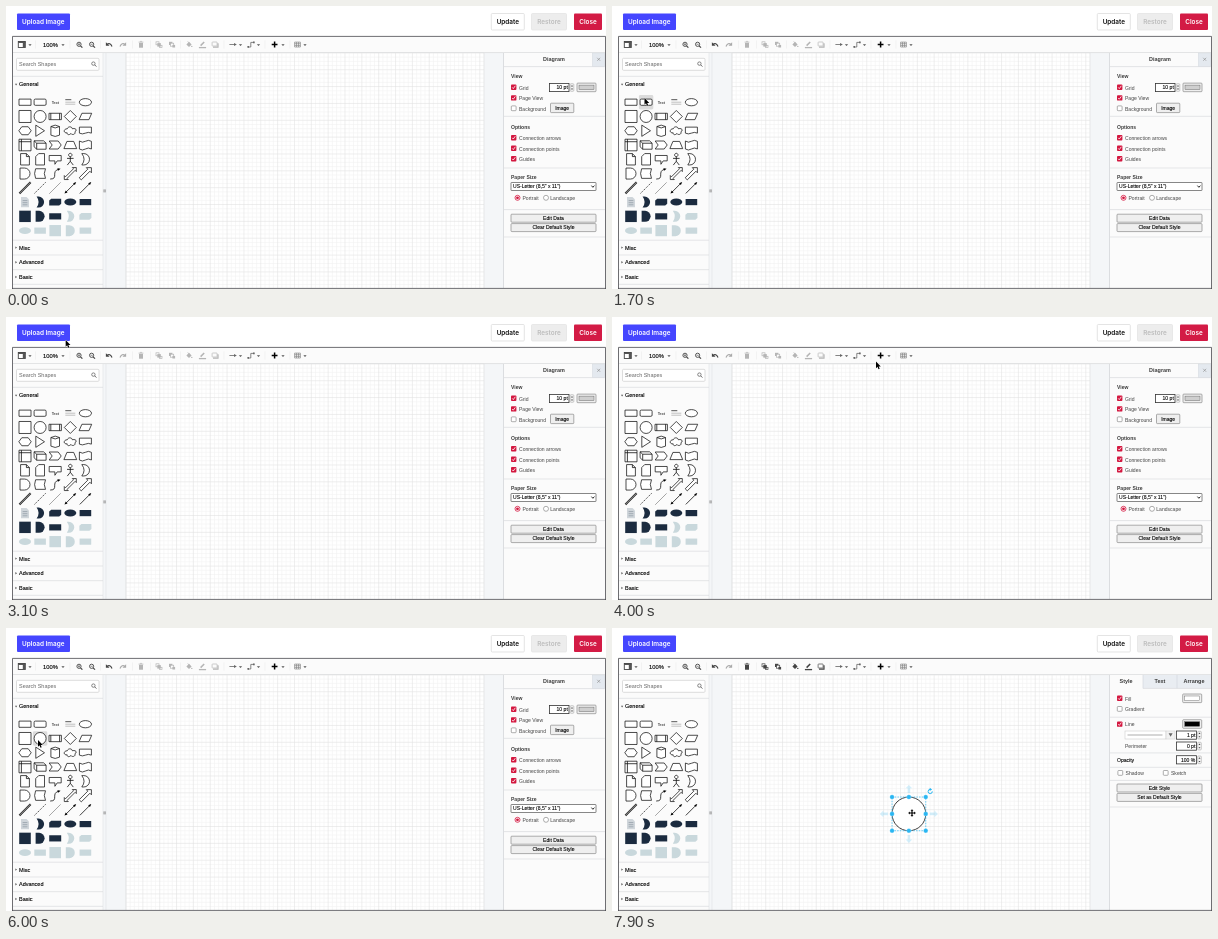
An HTML page that plays this animation: 600 by 283 pixels, repeating every 8 s.

```html
<!DOCTYPE html>
<html lang="en">
<head>
<meta charset="utf-8">
<title>Diagram editor</title>
<style>
html, body { margin: 0; width: 100%; height: 100%; overflow: hidden; background: #fff; }
svg { display: block; width: 600px; height: 283px; }
text { font: 5.05px "Liberation Sans", Arial, sans-serif; fill: #444; white-space: pre; }
.b { font-weight: 700; fill: #3c3c3c; }
.h { font-size: 5.5px; fill: #000; stroke: #000; stroke-width: .12; }
.t { font-size: 5.45px; font-weight: 700; fill: #3c3c3c; }
.k { fill: #000; stroke: #000; stroke-width: .1; }
.btn { font: 600 6.4px Inter, "Liberation Sans", sans-serif; }
.m { text-anchor: middle; }
.e { text-anchor: end; }
</style>
</head>
<body>
<svg id="stage" viewBox="0 0 600 283" xmlns="http://www.w3.org/2000/svg"></svg>
<script>
const LOOP = 8000, STEP = 100, PRESS = 6700, DRAG = 6900, DROP = 7300;
const UNIT = 4.2118, PAGE = { x: 120, y: 46.9, w: 358 };
const BLUE = '#29b6f2', DARK = '#1b2b3f', PALE = '#c9d8dc', RED = '#d3173f', LINE = '#dadcde';

const rect = (x, y, w, h, fill, stroke = 'none', r = 0, sw = .7) =>
  `<rect x="${x}" y="${y}" width="${w}" height="${h}" rx="${r}" fill="${fill}" stroke="${stroke}" stroke-width="${sw}"/>`;
const path = (d, stroke = '#000', sw = .8, fill = 'none', extra = '') =>
  `<path d="${d}" stroke="${stroke}" stroke-width="${sw}" fill="${fill}" ${extra}/>`;
const text = (x, y, s, cls = '', style = '') =>
  `<text x="${x}" y="${y}" class="${cls}" style="${style}">${s}</text>`;
const group = (id, body, attrs = '') => `<g id="${id}" ${attrs}>${body}</g>`;
const at = (x, y, body) => `<g transform="translate(${x} ${y})">${body}</g>`;
const hline = (x1, x2, y, c = LINE) => path(`M${x1} ${y}H${x2}`, c, .7);
const caret = (x, y = 39) => path(`M${x - 1.6} ${y - .8}h3.2l-1.6 1.9z`, 'none', 0, '#555');

function header() {
  return rect(11, 7.5, 53, 16.5, '#4546ff', 'none', 1) +
    text(37.3, 18, 'Upload Image', 'btn m', 'fill:#fff') +
    rect(485.3, 7.5, 33, 16.5, '#fff', '#d8d8d8', 1) + text(501.8, 18, 'Update', 'btn m', 'fill:#111') +
    rect(525.5, 7.5, 35, 16.5, '#ededed', '#e2e2e2', 1) + text(543, 18, 'Restore', 'btn m', 'fill:#bcbcbc') +
    rect(568, 7.5, 28, 16.5, '#d31b45', 'none', 1) + text(582, 18, 'Close', 'btn m', 'fill:#fff');
}

function canvasArea() {
  let minor = '', major = '';
  const add = (i, d) => { if (i % 4) minor += d; else major += d; };
  for (let i = 0; i <= 85; i++) add(i, `M${(PAGE.x + i * UNIT).toFixed(2)} 47V282`);
  for (let i = 0; i <= 55; i++) add(i, `M${PAGE.x} ${(PAGE.y + i * UNIT).toFixed(2)}h${PAGE.w}`);
  return rect(97, 47, 401, 235, '#f4f6f8') + rect(PAGE.x, 47, PAGE.w, 235, '#fff') +
    path(minor, '#f1f1f1', .6) + path(major, '#e3e3e3', .6) +
    path(`M${PAGE.x} 47V282M${PAGE.x + PAGE.w} 47V282`, '#dfe1e3', .6);
}

function lens(x, sign) {
  return at(x, 38.3, `<circle r="2.1" fill="none" stroke="#444" stroke-width=".9"/>` +
    path('M1.5 1.5L3.4 3.4', '#444', 1.2) + path(sign, '#444', .6));
}

// Icons that wake up once a shape is selected
function editIcons() {
  const c = 'currentColor';
  return at(135, 38.6, path('M-2.4-2.5h4.8M-.8-3.2h1.6', c, .8) + path('M-2-1.7h4v4.8h-4z', 'none', 0, c)) +
    at(153, 38.6, rect(-3, -2.8, 3, 3, 'none', c) + rect(-1.7, -1.5, 3.5, 3.5, c) + rect(.6, .7, 2.4, 2.2, 'none', c)) +
    at(166, 38.6, rect(-3, -2.8, 3.4, 3.2, c) + rect(-1.5, -1.4, 3.2, 3, '#fbfbfb', c) + rect(.4, .3, 2.7, 2.6, c)) +
    at(183, 38.4, path('M-2.6 0L0-2.6 2.6 0 0 2.6z', 'none', 0, c) + path('M-1.3-3L0-1.6', c, .7) + `<circle cx="2.8" cy="2" r=".7" fill="${c}"/>`) +
    at(196.5, 38.4, path('M-1.9 1.2L1.7-2.4', c, 1.5) + path('M-3.6 3.2h7.2', c, 1.3)) +
    at(209, 38.5, path('M-2 2.7h5v-4', c, 1.2) + rect(-2.9, -2.5, 5, 4, 'none', c, .6));
}

function toolbar() {
  let s = rect(7, 31, 592, 15.6, '#fbfbfb') + hline(7, 599, 46.6, '#d5d7d9');
  s += rect(12.3, 35.5, 7, 6, '#fff', '#444', 0, .9) + rect(12.3, 35.5, 7, 1.4, '#444') + rect(16.8, 36, 2.4, 5.5, '#555');
  s += text(37, 40.7, '100%', 'h', 'font-size:5.8px');
  s += [24, 57, 234.5, 252.5, 277, 299].map(x => caret(x)).join('');
  s += path([29.5, 64, 94.5, 126.5, 144.5, 174.5, 218, 259, 284].map(x => `M${x} 34.5v8`).join(''), '#ededed', .6);
  s += lens(73, 'M-1.1 0h2.2M0-1.1v2.2') + lens(85.6, 'M-1.1 0h2.2');
  s += at(103, 38.5, path('M-2 0Q1-2.4 3 2', '#444', 1.2) + path('M-3.1-2.3v3.6h3.6z', 'none', 0, '#444'));
  s += at(117, 38.5, path('M2 0Q-1-2.4-3 2', '#aaa', 1.2) + path('M3.1-2.3v3.6h-3.6z', 'none', 0, '#aaa'));
  s += group('edit', editIcons(), 'color="#b5b5b5"');
  s += at(227, 38.5, path('M-3.6 0h5', '#666', .8) + path('M1-1.5L3.8 0 1 1.5z', 'none', 0, '#666'));
  s += at(245, 38.5, path('M-3 2.5h2.8v-4.6h3', '#666', .8) + path('M-3.6 1.6h1.6v1.6h-1.6zM2-3h1.7v1.7H2z', 'none', 0, '#666'));
  s += path('M265.7 38.5h5.8M268.6 35.6v5.8', '#000', 1.5);
  s += at(291.5, 38.5, path('M-2.9-2.4h5.8v4.9h-5.8zM-2.9-.8h5.8M-2.9.9h5.8M-1-2.4v4.9M1-2.4v4.9', '#888', .7));
  return s;
}

const box = (w, h) => `M${-w / 2} ${-h / 2}h${w}v${h}h${-w}z`;
const oval = (a, b) => `M${-a} 0a${a} ${b} 0 1 0 ${2 * a} 0a${a} ${b} 0 1 0 ${-2 * a} 0z`;
const HALF = 'M-4.5-5.5h3.5a5.5 5.5 0 0 1 0 11h-3.5z';
const MOON = 'M-3.5-5.5h2a5.5 5.5 0 0 1 0 11h-2q4-5.5 0-11z';
const CARD = 'M-4-3.4H6V1.6L4 3.4H-6V-1.6z';
const o = d => path(d, '#111', .75, '#fff');
const l = d => path(d, '#111', .8);
const f = (d, c) => path(d, 'none', 0, c);
const tip = (x, y, a) => `<path transform="translate(${x} ${y}) rotate(${a})" d="M0 0l-3-1.3v2.6z"/>`;

const palette = [
  [o(box(12, 6.2)), rect(-6, -3.1, 12, 6.2, '#fff', '#111', 1.2, .75),
    text(0, 1.3, 'Text', 'm', 'font-size:3.9px;fill:#000'),
    path('M-5-2.5h6', '#555', 1) + path('M-5 0h10M-5 2h10', '#999', .6), o(oval(6.1, 3.6))],
  [o(box(12, 12)), o(oval(6, 6)), o(box(12.4, 6.4)) + l('M-4.4-3.2v6.4M4.4-3.2v6.4'),
    o('M0-6L6 0 0 6-6 0z'), o('M-3.5-3.2H6.3L3.5 3.2H-6.3z')],
  [o('M-3.2-4H3.2L6.2 0 3.2 4h-6.4L-6.2 0z'), o('M-4.3-5.6L4.4 0-4.3 5.6z'),
    o('M-4.3-4.2v8.6q4.3 2.6 8.6 0v-8.6') + o('M-4.3-4.2q4.3-2.8 8.6 0q-4.3 2.8-8.6 0z'),
    o('M-3-2c1-3 5-2 5 0c4-1 5 2 2.6 3c1 3-3 3.4-4 1.8c-2 2-4 1-3.7-.7c-4 .5-4-4 .1-4.1z'),
    o('M-6-3.6H6v6q-3-1.5-6 0t-6 0z')],
  [o(box(12, 11.6)) + l('M-3.6-5.8V5.8M-6-3.3H6'), o('M-6-4.2h9.4L6-1.8v6h-9.4L-6 1.8z') + l('M-6-4.2l2.6 2.4H6M-3.4-1.8v6'),
    o('M-6-4h9L6 0 3 4h-9l3-4z'), o('M-3.4-3.6h6.8l3 7.2H-6.4z'),
    o('M-6-4q3 2.2 6 .3t6 0V4q-3-2-6 0t-6 0z')],
  [o('M-4.4-5.7H1.4l3 3V5.7h-8.8z') + l('M1.4-5.7v3h3'), o('M-1.4-5.7h5.8V5.7h-8.8V-2.7z'),
    o('M-6-3.8H6v5.4H2L-.3 5V1.6H-6z'), o('M0-6a1.7 1.7 0 1 0 .01 0z') + l('M0-2.6V2M-3.3-.9h6.6M0 2l-3 3.8M0 2l3 3.8'),
    o('M-3.6-5.7h2a5.7 5.7 0 0 1 0 11.4h-2q4.5-5.7 0-11.4z')],
  [o('M-5-5.5h4.5a5.5 5.5 0 0 1 0 11H-5z'), o('M-4.5-4.8H5.4q-2.4 4.8 0 9.6h-9.9q-2-4.8 0-9.6z'),
    l('M-5 5.5C4 5.5-5-2.5 4-4.5') + tip(5.4, -4.9, -15),
    o('M-6 6v-4l1.2 1.2L3.2-4.8 2-6h4v4L4.8-3.2-3.2 4.8-2 6z'), o('M-6.2 4.2L2.4-4.4.9-5.9H6V-.8L4.5-2.3-4.1 6.3z')],
  [path('M-5.6 5.6L5.6-5.6', '#222', 2) + path('M-5.6 5.6L5.6-5.6', '#ddd', .6), path('M-5.6 5.6L5.6-5.6', '#222', .8, 'none', 'stroke-dasharray="1.4 1"'),
    path('M-5.6 5.6L5.6-5.6', '#222', .8, 'none', 'stroke-dasharray=".7 .7"'),
    l('M-5 5L5-5') + tip(5.8, -5.8, -45) + tip(-5.8, 5.8, 135), l('M-5.6 5.6L5-5') + tip(5.8, -5.8, -45)],
  [f('M-4-5.2H1.5L4-2.7V5.2h-8z', '#cfd5da') + path('M-2.4-1.5h4.8M-2.4.6h4.8M-2.4 2.7h4.8', '#8d99a3', .7),
    f(MOON, DARK), f(CARD, DARK), f(oval(6, 3.5), DARK), f(box(11.6, 6.2), DARK)],
  [f(box(11.6, 11.4), DARK), f(HALF, DARK), f(box(12, 6.2), DARK), f(MOON, PALE), f(CARD, PALE)],
  [f(oval(6, 3.4), PALE), f(box(11.6, 6.2), PALE), f(box(11.6, 11.2), PALE), f(HALF, PALE), f(box(11.6, 6.2), PALE)]
];
const colX = c => 19 + c * 15.1;
const rowY = r => 96.2 + r * 14.27;

function sidebar() {
  let s = rect(7, 47, 90, 235, '#fbfbfb') + path('M97 47V282M100 47V282', '#e0e2e4', .6);
  s += rect(10.5, 52.3, 82.5, 12, '#fff', '#cfcfcf', 1) + text(13, 60.2, 'Search Shapes', '', 'font-size:5.45px;fill:#666');
  s += `<circle cx="87.4" cy="57.6" r="1.7" fill="none" stroke="#555" stroke-width=".7"/>` + path('M88.7 58.9l1.7 1.7', '#555', .9);
  s += [70.3, 234.2, 249, 263.7, 278.3].map(y => hline(7, 97, y)).join('');
  s += path('M9 77.8h2.2l-1.1 1.6z', 'none', 0, '#555') + text(13, 80.4, 'General', 'h');
  ['Misc', 'Advanced', 'Basic'].forEach((name, i) => {
    const y = 243.5 + i * 14.7;
    s += path(`M9.4 ${y - 3.1}l1.6 1.2-1.6 1.2z`, 'none', 0, '#555') + text(13, y, name, 'h');
  });
  s += '<rect id="hover" width="14.4" height="14.4" rx="1.4" fill="#dbdbdb"/>';
  palette.forEach((row, r) => row.forEach((cell, c) => {
    s += `<g id="c${r}_${c}" transform="translate(${colX(c)} ${rowY(r)})">${cell}</g>`;
  }));
  return s + path('M98 183.4v3M99.2 183.4v3', '#777', .7);
}

const check = (x, y, on, label, lx = 8) => (on
  ? rect(x, y, 5.4, 5.4, RED, 'none', .9) + path(`M${x + 1.2} ${y + 2.8}l1.1 1.2 2-2.8`, '#fff', .8)
  : rect(x + .3, y + .3, 4.8, 4.8, '#fff', '#777', .8, .6)) + text(x + lx, y + 5, label);
const button = (x, y, w, h, label) =>
  rect(x, y, w, h, '#efefef', '#777', .8, .6) + text(x + w / 2, y + h / 2 + 1.8, label, 'k m');
const swatch = (x, y, c) => rect(x, y, 19, 8.6, '#efefef', '#777', .8, .6) + rect(x + 2, y + 2, 15, 4.6, c, '#555', 0, .4);
const field = (x, y, w, value) => rect(x, y, w, 8.2, '#fff', '#333', 0, .8) +
  text(x + w - 1.2, y + 5.9, value, 'k e') + rect(x + w + 1.2, y + .3, 3.6, 7.6, '#f4f4f4', '#999', .8, .5) +
  path(`M${x + w + 2} ${y + 3}l1-1.4 1 1.4zM${x + w + 2} ${y + 5.2}l1 1.4 1-1.4z`, 'none', 0, '#444');
const rules = ys => ys.map(y => hline(498, 599, y)).join('');

function diagramPanel() {
  return rules([60.6, 110.3, 162, 203.6, 231]) +
    text(548, 55.3, 'Diagram', 't m') + rect(586.3, 47, 12.4, 13.4, '#e4e9ef', '#d5dae0', 0, .5) +
    path('M591.2 51.8l3 3M594.2 51.8l-3 3', '#888', .6) +
    text(505, 72.2, 'View', 'b') + check(505, 78.6, true, 'Grid') + field(543.5, 77.4, 19.5, '10 pt') + swatch(571, 77.1, '#cfcfcf') +
    check(505, 89.2, true, 'Page View') + check(505, 99.6, false, 'Background') + button(544.5, 97.2, 23.3, 9.4, 'Image') +
    text(505, 122.8, 'Options', 'b') + check(505, 129, true, 'Connection arrows') +
    check(505, 139.6, true, 'Connection points') + check(505, 150, true, 'Guides') +
    text(505, 172.8, 'Paper Size', 'b') + rect(505, 176.5, 85, 8, '#fff', '#555', .5, .7) +
    text(507, 182.4, 'US-Letter (8,5" x 11")', 'k') + path('M585.4 179.6l1.5 1.7 1.5-1.7', '#111', .9) +
    `<circle cx="511.5" cy="191.8" r="2.5" fill="#fff" stroke="${RED}" stroke-width=".8"/><circle cx="511.5" cy="191.8" r="1.4" fill="${RED}"/>` +
    text(516.5, 193.8, 'Portrait') + '<circle cx="540" cy="191.8" r="2.5" fill="#fff" stroke="#777" stroke-width=".6"/>' +
    text(544.3, 193.8, 'Landscape') + button(505, 208.2, 85, 8, 'Edit Data') + button(505, 217.6, 85, 8, 'Clear Default Style');
}

function stylePanel() {
  return rect(531, 47, 68, 13.4, '#e9edf2') + path('M531 47v13.4M565 47v13.4', '#d0d5da', .6) + hline(531, 599, 60.4) +
    rules([89.2, 124.9, 139.3, 152.4, 179]) +
    text(514, 55.3, 'Style', 't m') + text(548, 55.3, 'Text', 't m') + text(582, 55.3, 'Arrange', 't m') +
    check(505, 67.6, true, 'Fill') + swatch(570.7, 66, '#fff') + check(505, 78.2, false, 'Gradient') +
    check(505, 93.4, true, 'Line') + swatch(570.7, 91.7, '#000') +
    rect(513, 103, 41, 8, '#fff', '#ccc', 0, .6) + path('M515.5 107h35', '#777', .6) +
    rect(554, 103, 9, 8, '#f1f1f1', '#ccc', 0, .5) + path('M556.6 105.2h4l-2 3.6z', 'none', 0, '#666') +
    field(564.5, 103, 20, '1 pt') + text(513, 120, 'Perimeter') + field(564.5, 114, 20, '0 pt') +
    text(505, 133.6, 'Opacity', 'k') + field(564.5, 127.7, 20, '100 %') +
    check(505.6, 142.2, false, 'Shadow') + check(551, 142.2, false, 'Sketch') +
    button(505, 156, 85, 8, 'Edit Style') + button(505, 165.4, 85, 8, 'Set as Default Style');
}

function selection() {
  const r = UNIT * 4, x = PAGE.x + UNIT * 42, y = PAGE.y + UNIT * 33;
  let s = path(oval(r, r), '#111', .8, '#fff') + path(box(2 * r, 2 * r), BLUE, .7, 'none', 'stroke-dasharray="1.5 1.2"');
  for (let a = 0; a < 360; a += 90)
    s += `<path transform="rotate(${a}) translate(0 -23.4)" d="M0-5.6L3.3-2.2H1.3V2.4h-2.6V-2.2h-2z" fill="${BLUE}" opacity=".2"/>`;
  for (const i of [-1, 0, 1]) for (const j of [-1, 0, 1])
    if (i || j) s += `<circle cx="${i * r}" cy="${j * r}" r="2.3" fill="${BLUE}" stroke="#fff" stroke-width=".3"/>`;
  s += path('M23.4-22.5a2.1 2.1 0 1 1-2-2', BLUE, 1) + path('M20.8-26.1l2.4 1.7-2.4 1.6z', 'none', 0, BLUE);
  return at(x, y, s);
}

const arrow = path('M0 0V6.7L1.5 5.3 2.5 7.7 3.7 7.2 2.7 4.9H4.8z', '#fff', .6, '#000', 'paint-order="stroke"');
const cross = path('M0-3.8l1.5 1.6H.6V-.6h1.6v-.9L3.8 0 2.2 1.5V.6H.6v1.6h.9L0 3.8l-1.5-1.6h.9V.6h-1.6v.9L-3.8 0l1.6-1.5v.9h1.6v-1.6h-.9z',
  '#fff', .8, '#000', 'paint-order="stroke"');

document.getElementById('stage').innerHTML = rect(0, 0, 600, 283, '#fff') + header() + canvasArea() + toolbar() + sidebar() +
  rect(497.5, 47, 102, 235, '#fbfbfb') + path('M497.5 47V282', '#cfd2d5', .7) +
  group('diagram', diagramPanel()) + group('style', stylePanel()) +
  path('M6.5 283V30.4H599.5V283M6 282.4H600', '#4a4a4f', .8) +
  group('picked', selection()) +
  group('ghost', path(box(UNIT * 8, UNIT * 8), '#000', .6, 'none', 'stroke-dasharray="1.3 1.3"')) +
  group('arrow', arrow) + group('cross', cross);

// Pointer track: time, x, y
const track = [
  [300, 112, 118], [900, 52, 100], [1100, 41, 101.5], [1500, 32, 108], [1900, 33, 76], [2300, 36, 32],
  [2500, 35, 27], [2900, 39, 19], [3200, 70, 25], [3900, 262, 44], [4000, 264, 44.5], [4400, 262, 46],
  [5000, 62, 94], [5300, 37, 100], [5600, 34, 108], [6000, 32, 112], [DRAG, 32, 112], [DROP, 300, 185]
];
function pointer(t) {
  const i = track.findIndex(k => k[0] > t);
  if (i === 0) return track[0].slice(1);
  if (i < 0) return track[track.length - 1].slice(1);
  const [t0, x0, y0] = track[i - 1], [t1, x1, y1] = track[i];
  const p = (t - t0) / (t1 - t0);
  return [x0 + (x1 - x0) * p, y0 + (y1 - y0) * p];
}
function cellAt([x, y]) {
  const c = Math.round((x - 19) / 15.1), r = Math.round((y - 96.2) / 14.27);
  return palette[r] && palette[r][c] ? [r, c] : null;
}

const el = id => document.getElementById(id);
const show = (id, on) => el(id).setAttribute('display', on ? 'inline' : 'none');
const move = (id, x, y) => el(id).setAttribute('transform', `translate(${x} ${y})`);

function render(t) {
  const [x, y] = pointer(t), done = t >= DROP, dragging = t > DRAG && !done;
  const cell = t > 300 && t <= DRAG ? cellAt(pointer(t - STEP)) : null;
  const pressed = t >= PRESS && t <= DRAG;
  show('hover', cell);
  if (cell) move('hover', colX(cell[1]) - 7.2, rowY(cell[0]) - 7.2);
  el('hover').setAttribute('opacity', pressed ? .45 : 1);
  el('c1_1').setAttribute('opacity', pressed ? .6 : 1);
  show('arrow', t >= 300 && !done);
  show('cross', done);
  show('ghost', dragging);
  show('picked', done);
  show('style', done);
  show('diagram', !done);
  el('edit').setAttribute('color', done ? '#444' : '#b5b5b5');
  for (const id of ['arrow', 'cross', 'ghost']) move(id, x, y);
}

const start = performance.now();
function frame() {
  const t = (performance.now() - start) % LOOP;
  render(Math.floor(t / STEP) * STEP);
  requestAnimationFrame(frame);
}
render(0);
requestAnimationFrame(frame);
</script>
</body>
</html>
```
